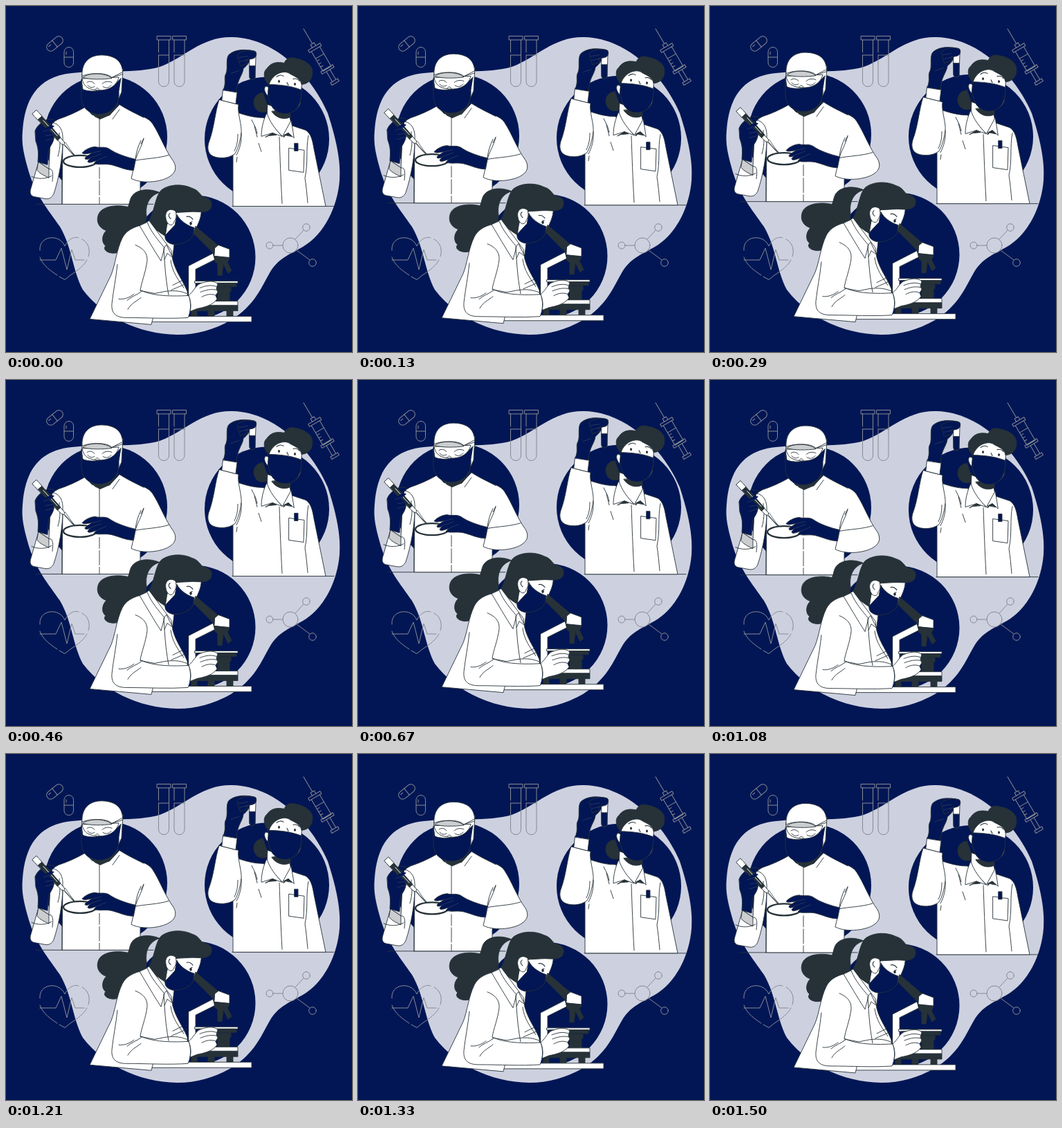
Recreate the animation shown at these times as an HTML page. Size 500 px wide and 500 px high, loop 1.54 s.

```html
<!DOCTYPE html>
<html lang="en">
<head>
<meta charset="utf-8">
<title>Laboratory team</title>
<style>
  html, body { margin: 0; width: 100%; height: 100%; overflow: hidden; background: #021655; }
  svg { display: block; width: 100vw; height: 100vh; }
  g { stroke-linecap: round; stroke-linejoin: round; }
  .float { stroke: #263238; stroke-width: .9; fill: none; }
  .w { fill: #fff; }
  .n { fill: #021655; }
  .d { fill: #263238; }
  .s { fill: #cbcdcf; }
  .disc { fill: #021655; stroke: none; }
  .crease { stroke: #35415f; stroke-width: .7; }
  .icons { fill: none; stroke: #858a94; stroke-width: 1; }
</style>
</head>
<body>
<svg viewBox="0 0 500 500">
  <rect width="500" height="500" fill="#021655"/>
  <path fill="#cdd1df" d="M327 45C395 47 445 108 465 155C478 195 484 225 482 252C479 290 460 330 429 348C406 361 394 365 382 384C368 408 360 432 325 454C300 468 275 475 248 475C190 474 140 448 111 410C96 382 96 350 78 319C60 293 44 275 33 240C26 215 22 200 24 180C27 138 43 102 95 97C140 92 188 98 222 88C258 75 282 44 327 45Z"/>

  <g class="icons">
    <!-- capsules -->
    <g transform="rotate(-39 70.500 54.500)"><rect x="57" y="48.500" width="27" height="12" rx="6"/><path d="M70.500 48.500v12M61 52h4"/></g>
    <rect x="84" y="59.500" width="13.500" height="29" rx="6.700"/><path d="M84 74h13.500M87 66v4"/>
    <!-- test tubes -->
    <path id="tube" d="M218.500 43.500h19.500v5.500h-19.500zM220.500 49v18m0 4v38a7.500 7.500 0 0 0 15 0V49M220.500 71h15"/>
    <use href="#tube" x="22.500"/>
    <!-- syringe -->
    <g transform="translate(430 33) rotate(-30.500)">
      <path d="M0 0V25M-3 25h6v5h-6zM-10 30H10v4H-10zM-7 34V67H7V34M-7 46H7M-7 50h4m-4 5h4m-4 5h4M-10 66H10v4H-10zM-3 70V87M3 70V87M-6 87H6v4H-6z"/>
    </g>
    <!-- heart -->
    <path d="M49 353C47 332 77 328 85 347C91 335 100 333 105 335M110 337C120 342 122 354 119 362M49 363C53 375 65 383 74 389M77 391L85 395.500L93 389C104 382 113 375 117 367M49 367H72L80 350L88 381L95 352L100 367H113"/>
    <!-- molecule -->
    <circle cx="411" cy="346" r="11"/><circle cx="434" cy="320" r="5.300"/><circle cx="381" cy="346" r="5"/><circle cx="443" cy="371" r="5.300"/>
    <path d="M418 337L430 324M400 346H386M420 353L439 367"/>
  </g>

  <!-- man with pipette -->
  <g class="float">
    <circle class="disc" cx="144" cy="190" r="89"/>
    <path d="M43 287H213"/>
    <path class="w" d="M114 147C102 154 88 160 76 164L67 169L82 195L81 287H194V256L212 171C206 163 184 156 164 143L150 158H125Z"/>
    <path class="w" d="M199 192C196 205 189 214 187 224L181 250C199 259 228 254 238 246C245 241 247 234 242 225C230 209 222 186 212 171C209 166 204 163 199 161"/>
    <path d="M186 224C200 221 220 221 235 216M195 195C191 203 188 212 187 222M135 161V207M135 211V229M135 234V250M135 253V274M135 277V287M158 148L149 159M164 150L154 164M81 246V287"/>
    <path stroke="#fff" stroke-width="2" d="M199 164V189"/>
    <path d="M199 192L195 200"/>
    <path class="w" d="M67 169C78 171 83 181 82 195C82 218 77 248 69 272C66 278 62 280 56 279L40 276C35 274 34 270 36 264L47 226L62 236L64 195Z"/>
    <path class="s" d="M47 226L62 236V249C56 246 49 243 45 238Z"/>
    <path d="M62 236C69 235 68 245 67 254M37 247C46 251 57 251 66 246M77 184V192M78 198C78 205 77 211 75 218"/>
    <path class="n" d="M42 181C45 172 56 165 62 164L69 165C73 168 66 171 61 173L68 178C72 183 70 187 69 193C67 202 61 205 61 214L60 230L46 226C47 212 47 207 43 196Z"/>
    <g transform="translate(41 153.500) rotate(-42.500)">
      <path class="w" d="M-4 0H4V12H-4ZM-2.500 52H2.500V61L.7 64V86H-.7V64L-2.500 61Z"/>
      <path class="d" d="M-3.800 12H3.800L3 53H-3Z"/>
      <path stroke="#fff" d="M1 18V48M-4 5H4"/>
    </g>
    <path class="n" stroke="none" d="M50 184C58 176 64 171 70 174L62 181L71 187L60 190L68 194L55 199Z"/>
    <path class="crease" d="M54 182L65 178M57 188L70 186M57 195L68 192"/>
    <ellipse class="w" cx="107" cy="225" rx="24" ry="8.500" stroke-width="2.300"/>
    <path class="w" stroke-width=".7" d="M84 200L99 217L86 198Z"/>
    <path class="n" d="M187 222C174 219 159 214 149 207C143 203 136 206 129 204C123 204 114 208 110 213C113 216 120 213 124 213L115 219C112 222 117 224 122 220L118 225C119 229 126 225 131 224L127 228C134 231 143 228 152 230C164 233 173 238 184 238Z"/>
    <path class="crease" d="M124 213L137 210M122 220L138 214M131 224L145 218"/>
    <path class="d" d="M120 150L128 160L136 164L150 158L162 142Z"/>
    <path class="w" d="M110 98L109 118C112 128 155 136 163 134L167 125L169 91Z"/>
    <path class="n" d="M109 107L111 121C122 126 149 125 166 105L163 124C164 139 158 152 143 156C130 160 116 153 112 145C108 138 109 127 109 118Z"/>
    <path class="w" d="M110 106C112 116 118 121 130 122C145 124 159 118 163 104Z"/>
    <path d="M117 111C121 108 126 110 128 113M139 113C143 109 149 109 153 111M118 115C121 119 125 119 128 117M140 117C144 120 149 119 152 115M129 121C131 118 134 119 135 122"/>
    <path class="s" d="M111 104C117 97 143 96 153 105C140 107 121 107 111 104Z"/>
    <path class="w" d="M110 101C109 82 121 71 139 71.500C158 72 168 81 168.500 96L153 104C146 96 120 97 110 102Z"/>
    <path d="M153 104C158 102 164 101 168.500 99"/>
  </g>

  <!-- woman with test tube -->
  <g class="float">
    <circle class="disc" cx="377" cy="193" r="90"/>
    <path d="M327 290H474"/>
    <path class="d" d="M371 126C360 127 356 137 359 145C362 155 374 156 380 151Z"/>
    <path class="w" d="M336 155C348 159 359 162 372 162L402 190L412 173L433 180C441 185 443 195 445 207L462 290H328V214Z"/>
    <path class="w" d="M308 136L336 143C334 155 341 172 340 184C338 198 335 207 331 214C321 222 305 221 298 217C291 213 291 204 293 198C301 177 302 154 308 136Z"/>
    <path class="w" d="M314 121L334 125L332 142L312 137Z"/>
    <path class="n" d="M314 122C319 110 314 105 318 98C321 91 317 77 322 71C330 64 343 62 360 66C364 70 357 74 352 76C353 83 346 88 343 91C342 101 334 106 333 125Z"/>
    <path class="w" d="M352 72L361 73L360 104C358 109 353 108 352 104Z"/>
    <path class="n" d="M352 87H360V104C358 109 353 108 352 104Z"/>
    <path class="n" d="M334 71C342 64 353 63 361 67C363 72 361 76 355 77L346 79L350 83L339 87Z"/>
    <path class="crease" d="M336 75L349 73M338 81L350 78M325 98L337 94"/>
    <path class="w" d="M378 143L377 161C384 174 394 184 401 190L412 171L409 155Z"/>
    <path class="d" d="M384 153C390 162 401 166 411 161L410 150Z"/>
    <path class="w" d="M382 103C378 117 379 137 389 150C400 159 420 155 425 142L428 107C419 90 397 88 382 103Z"/>
    <path class="n" d="M379 114C394 114 413 116 427 122C427 135 425 145 418 151C407 160 392 157 385 147C380 139 377 126 379 114Z"/>
    <path class="w" d="M379 118C373 113 371 123 378 130Z"/>
    <path class="d" d="M380 114C372 108 371 95 377 91C383 82 392 81 402 83C405 76 411 74 418 76C429 78 439 83 442 91C445 102 440 113 427 114C426 106 419 103 411 99C403 92 385 98 380 114Z"/>
    <path d="M391 103C394 100 399 100 401 102M415 106C419 105 422 106 424 109M406 111L408 115" stroke-width="1.100"/>
    <ellipse class="d" cx="394.500" cy="109.500" rx="1" ry="1.700"/><ellipse class="d" cx="417.500" cy="113.500" rx="1" ry="1.700"/>
    <path class="w" d="M377 155C372 165 369 177 369 189L385 184L399 189C390 179 381 169 377 155ZM412 166L400 188L408 184L416 191Z"/>
    <path class="d" d="M375 190L385 184L391 187L380 188ZM403 187L408 184L413 189Z"/>
    <path d="M395 190C396 220 397 250 399 286M437 188C433 208 437 226 432 249C434 262 435 274 436 285M355 165C359 173 362 178 363 185M359 174L363 190M365 199L369 211M340 184C341 195 338 207 333 216M335 186C335 198 333 204 330 210M334 219L333 226"/>
    <path class="w" d="M409 206L431 209L430 241L409 238Z"/>
    <path class="n" d="M417 199H422V210H417Z"/>
  </g>

  <!-- woman at microscope -->
  <g class="float">
    <circle class="disc" cx="271" cy="363.500" r="89.500"/>
    <path class="d" d="M222 270C208 264 191 265 183 274C178 280 179 287 176 291C160 287 139 290 134 301C129 312 135 322 145 325C137 333 139 344 144 347C138 354 151 360 161 357C177 352 187 337 193 325C198 319 204 312 203 304C201 289 206 275 222 270Z"/>
    <path class="w" d="M207 311C207 325 213 333 229 363L241 362L244 336L235 302Z"/>
    <path class="w" d="M234 310L246 297L282 296C283 306 276 319 272 327C265 342 242 346 230 334Z"/>
    <path class="n" d="M247 302C251 310 260 317 272 321L271 331C266 341 253 346 241 345C233 343 229 339 230 332L244 317Z"/>
    <path class="d" d="M205 313C214 303 215 276 224 267C235 258 255 257 269 264C277 266 280 272 284 276C296 278 300 285 295 294C287 301 276 297 266 298L247 299C239 304 234 310 232 319L230 333C222 328 212 321 205 313Z"/>
    <path class="w" d="M245 297C236 291 229 298 231 307C232 317 241 321 243 312C247 307 246 301 245 297Z"/>
    <path d="M237 300C234 302 235 306 238 308M261 305C265 304 268 306 270 309M266 314L269 312" stroke-width="1.100"/>
    <ellipse class="d" cx="267" cy="315" rx="1.200" ry="2"/>

    <path class="w" d="M264 376L299 358L302 367L274 381V432H264Z"/>
    <path class="d" d="M274 319L307 347L300 358L271 329Z"/>
    <path class="w" d="M302 350L307 346L323 352V364L301 362Z"/>
    <path class="d" d="M301 362L323 365L320 371L326 383L321 387L314 373L312 390H306V373L302 370Z"/>
    <path class="w" d="M273 398H335V401H273Z"/>
    <path class="d" d="M277 401H333V406H277ZM303 407H325V413H323V427H306V413H303ZM269 433H335V441H328V449H319V441H301V449H292V441H276V449H268Z"/>
    <path class="w" d="M283 427H335V433H283Z"/>
    <path class="w" d="M208 449H355V457H208Z"/>

    <path class="w" d="M193 318C182 321 173 326 168 336C160 352 158 374 152 389L121 453L210 461L213 449L263 443L262 413C255 396 246 386 241 368L239 354L207 311Z"/>
    <path class="w" d="M193 318L204 313C210 328 220 339 229 350L224 369C213 352 202 333 193 318ZM232 346L241 364L233 358L229 367L228 351Z"/>
    <path d="M229 367C230 384 232 403 235 418M238 368C240 385 249 396 257 408M241 404L255 397M239 411L260 402"/>
    <path class="w" d="M187 346C197 350 205 357 204 369C202 385 196 399 194 411C207 418 231 421 264 419C268 430 267 442 263 451C235 453 205 451 174 451C158 451 152 444 153 431C155 412 159 394 161 374"/>
    <path d="M194 412L215 416L230 413C245 411 254 413 261 416M196 413C188 419 180 421 175 426M195 422C188 428 181 430 176 439M163 424C171 425 178 422 185 417"/>
    <path class="w" d="M264 419C272 412 273 406 280 402C288 399 299 396 306 402L304 409L306 414L303 419L305 424C298 434 285 436 276 438L266 442C268 434 267 426 264 419Z"/>
    <path d="M280 408C288 405 296 403 304 406M281 414C289 411 296 409 305 411M283 421C290 417 297 416 304 419"/>
  </g>
</svg>
<script>
  const LOOP = 1540, PEAK = 725, RISE = 10;
  const groups = document.querySelectorAll('.float');

  function draw(now) {
    const t = now % LOOP;
    const gap = Math.abs(t - PEAK);
    const distance = Math.min(gap, LOOP - gap);
    const y = -RISE * (1 - distance / (LOOP / 2));
    groups.forEach(group => group.setAttribute('transform', `translate(0 ${y.toFixed(2)})`));
    requestAnimationFrame(draw);
  }
  draw(0);
</script>
</body>
</html>
```
